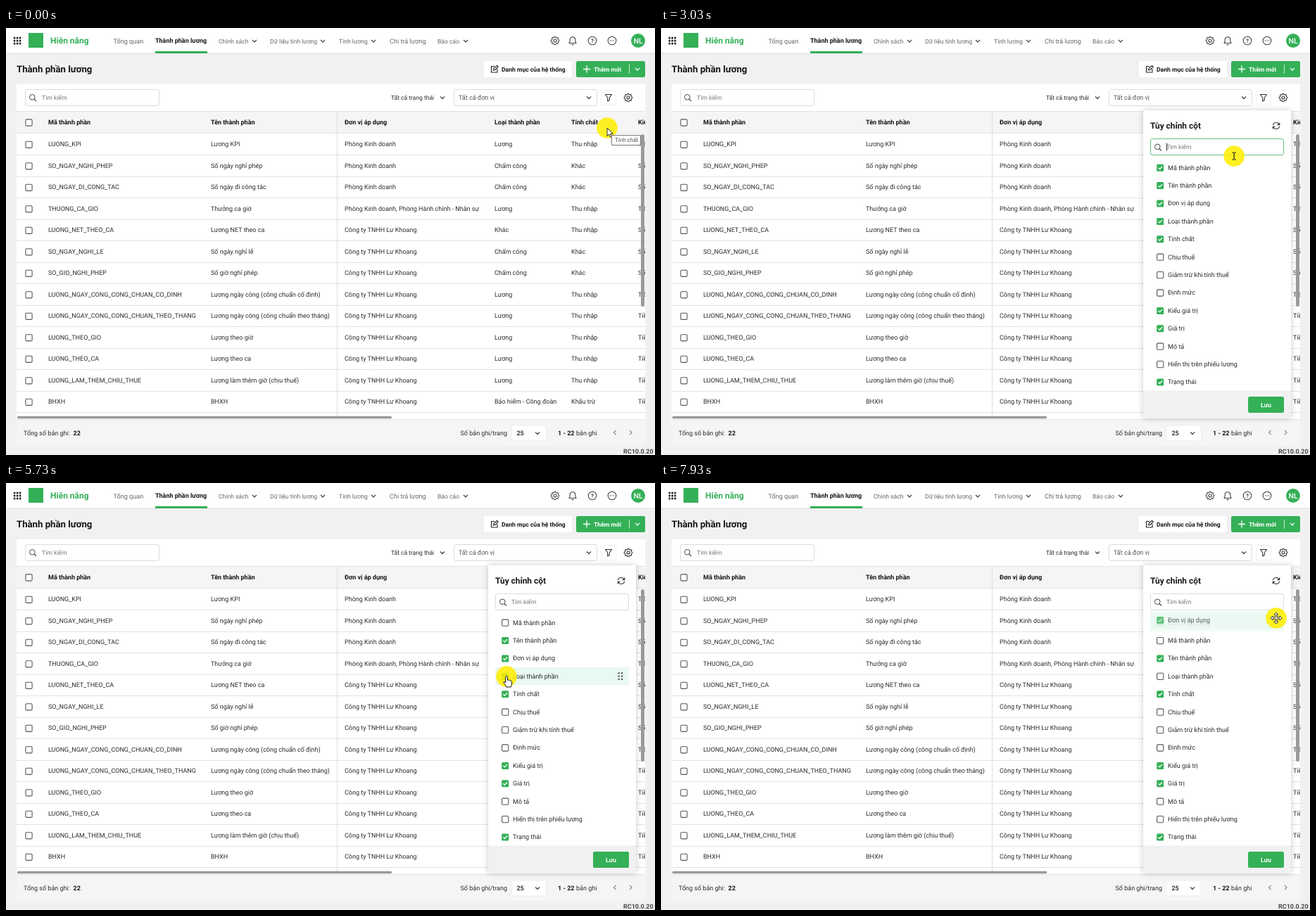
Animation of 922x607 px, one loop 8 s. Source, as an HTML page with a canvas:

```html
<!DOCTYPE html>
<html lang="vi">
<head>
<meta charset="utf-8">
<title>Tùy chỉnh cột</title>
<style>
  html, body { margin: 0; width: 100%; height: 100%; overflow: hidden; background: #f1f1f2; }
  canvas { display: block; }
</style>
</head>
<body>
<canvas id="stage" width="922" height="607"></canvas>
<script>
const ctx = document.getElementById('stage').getContext('2d');
ctx.textRendering = 'geometricPrecision';

const LOOP = 8000;
const GREEN = '#34b057', INK = '#2b2b2b', DARK = '#161616', GRAY = '#666', LINE = '#e2e3e4';

// ---------- drawing helpers ----------
// y is the middle of the capital letters
function text(s, x, y, size = 9, color = INK, weight = 400, align = 'left') {
  ctx.font = `${weight} ${size}px Roboto, sans-serif`;
  ctx.fillStyle = color;
  ctx.textAlign = align;
  ctx.fillText(s, x, y + size * 0.355);
}
const bold = (s, x, y, size = 9, color = DARK, align = 'left') => text(s, x, y, size, color, 700, align);

function rect(x, y, w, h, color) {
  ctx.fillStyle = color;
  ctx.fillRect(x, y, w, h);
}

function box(x, y, w, h, r, fill, stroke, width = 1) {
  ctx.beginPath();
  ctx.roundRect(x, y, w, h, r);
  if (fill) { ctx.fillStyle = fill; ctx.fill(); }
  if (stroke) { ctx.strokeStyle = stroke; ctx.lineWidth = width; ctx.stroke(); }
}

function circle(x, y, r, fill, stroke, width = 1, turn = 1) {
  ctx.beginPath();
  ctx.arc(x, y, r, -Math.PI / 2, -Math.PI / 2 + turn * 2 * Math.PI);
  if (fill) { ctx.fillStyle = fill; ctx.fill(); }
  if (stroke) { ctx.strokeStyle = stroke; ctx.lineWidth = width; ctx.stroke(); }
}

function shape(d, x, y, stroke, width = 1, fill) {
  const path = new Path2D(d);
  ctx.save();
  ctx.translate(x, y);
  ctx.lineJoin = 'round';
  if (fill) { ctx.fillStyle = fill; ctx.fill(path); }
  if (stroke) { ctx.strokeStyle = stroke; ctx.lineWidth = width; ctx.stroke(path); }
  ctx.restore();
}

const chevron = (x, y, color = '#444') => shape('M-3-1.5 0 1.5 3-1.5', x, y, color, 1.2);

function magnifier(x, y) {
  circle(x - 0.7, y - 0.7, 3.8, null, '#444');
  shape('M2 2 5 5', x, y, '#444', 1.1);
}

function gear(x, y, color = '#444') {
  ctx.beginPath();
  for (let i = 0; i <= 64; i++) {
    const a = i / 64 * 2 * Math.PI;
    const r = 5.2 + 0.7 * Math.cos(8 * a);
    ctx.lineTo(x + r * Math.cos(a), y + r * Math.sin(a));
  }
  ctx.strokeStyle = color;
  ctx.lineWidth = 1.1;
  ctx.stroke();
  circle(x, y, 2, null, color, 1.1);
}

function checkbox(x, y, checked) {
  if (!checked) return box(x - 4.6, y - 4.6, 9.2, 9.2, 1.5, '#fff', '#555', 1.1);
  box(x - 5, y - 5, 10, 10, 1.5, GREEN);
  shape('M-2.8 0-.8 2 3-2', x, y, '#fff', 1.3);
}

// ---------- page ----------
const COMPANY = 'Công ty TNHH Lư Khoang', SALES = 'Phòng Kinh doanh';
const PAY = ['Lương', 'Thu nhập', 'Tiền tệ'], SHIFT = ['Chấm công', 'Khác', 'Số'];
const COLUMNS = [60, 291, 481, 694, 803, 898];
const HEADERS = ['Mã thành phần', 'Tên thành phần', 'Đơn vị áp dụng', 'Loại thành phần', 'Tính chất', 'Kiểu giá trị'];
const ROWS = [
  ['LUONG_KPI', 'Lương KPI', SALES, ...PAY],
  ['SO_NGAY_NGHI_PHEP', 'Số ngày nghỉ phép', SALES, ...SHIFT],
  ['SO_NGAY_DI_CONG_TAC', 'Số ngày đi công tác', SALES, ...SHIFT],
  ['THUONG_CA_GIO', 'Thưởng ca giờ', SALES + ', Phòng Hành chính - Nhân sự', ...PAY],
  ['LUONG_NET_THEO_CA', 'Lương NET theo ca', COMPANY, 'Khác', 'Thu nhập', 'Số'],
  ['SO_NGAY_NGHI_LE', 'Số ngày nghỉ lễ', COMPANY, ...SHIFT],
  ['SO_GIO_NGHI_PHEP', 'Số giờ nghỉ phép', COMPANY, ...SHIFT],
  ['LUONG_NGAY_CONG_CONG_CHUAN_CO_DINH', 'Lương ngày công (công chuẩn cố định)', COMPANY, ...PAY],
  ['LUONG_NGAY_CONG_CONG_CHUAN_THEO_THANG', 'Lương ngày công (công chuẩn theo tháng)', COMPANY, ...PAY],
  ['LUONG_THEO_GIO', 'Lương theo giờ', COMPANY, ...PAY],
  ['LUONG_THEO_CA', 'Lương theo ca', COMPANY, ...PAY],
  ['LUONG_LAM_THEM_CHIU_THUE', 'Lương làm thêm giờ (chịu thuế)', COMPANY, ...PAY],
  ['BHXH', 'BHXH', COMPANY, 'Bảo hiểm - Công đoàn', 'Khấu trừ', 'Tiền tệ'],
];

function drawTopBar() {
  rect(0, 35, 922, 2, '#e4e4e5');
  rect(0, 0, 922, 35.5, '#fff');
  for (let i = 0; i < 9; i++) box(10.8 + i % 3 * 4, 12.8 + Math.floor(i / 3) * 4, 2.6, 2.6, 0.6, '#222');
  rect(32, 7, 21, 21, GREEN);
  bold('Hiên nắng', 63, 18, 12, GREEN);

  text('Tổng quan', 152.5, 18.3, 9.1, GRAY);
  bold('Thành phần lương', 212, 18.3);
  rect(212, 33, 74, 3, GREEN);
  const menus = [['Chính sách', 302, 353], ['Dữ liệu tính lương', 375, 450], ['Tính lương', 473, 522], ['Báo cáo', 613, 653]];
  for (const [label, x, arrow] of menus) {
    text(label, x, 18.5, 8.6, GRAY);
    chevron(arrow, 18.5);
  }
  text('Chi trả lương', 545, 18.3, 9.1, GRAY);

  gear(780, 18);
  shape('M-5 3.5C-3.6 2-3.8.5-3.8-1.2-3.8-6.6 3.8-6.6 3.8-1.2 3.8.5 3.6 2 5 3.5ZM-1.5 5.2Q0 6.6 1.5 5.2', 805, 18, '#444', 1.1);
  circle(833, 18, 5.8, null, '#444', 1.1);
  bold('?', 833, 18, 8, '#444', 'center');
  circle(861, 18, 5.8, null, '#444', 1.1);
  for (const dx of [-2.5, 0, 2.5]) circle(861 + dx, 18, 0.7, '#444');
  circle(898, 18, 10, GREEN);
  text('NL', 898, 18, 10.5, '#fff', 500, 'center');
}

function drawToolbar() {
  bold('Thành phần lương', 15, 58, 13.2);
  box(679, 47, 125, 23, 2, '#fff');
  shape('M0-4H-4.5V4.5H4V0M-1.5 1.5-1-1 3.5-5.2 5.2-3.5 1 1Z', 694, 58.5, '#222', 1.1);
  bold('Danh mục của hệ thống', 704, 58.5, 8.6);
  box(810, 47, 98, 23, 2.5, GREEN);
  shape('M-5 0H5M0-5V5', 825, 58.5, '#fff', 1.3);
  bold('Thêm mới', 835, 58.5, 8.6, '#fff');
  rect(885, 52, 1, 13, '#c9eed3');
  chevron(897, 58.5, '#fff');

  rect(15, 80, 893, 514, '#f5f5f6');
  rect(15, 80, 893, 476, '#fff');
  box(27.5, 87.5, 190, 23, 2.5, '#fff', '#dcdcdc');
  magnifier(38, 99);
  text('Tìm kiếm', 51, 99, 8.6, '#777');
  text('Tất cả trạng thái', 547, 99, 8.5);
  chevron(620, 99);
  box(636.5, 87.5, 203, 23, 2.5, '#fff', '#dcdcdc');
  text('Tất cả đơn vị', 643, 99, 9, '#555');
  chevron(828, 99);
  box(845.5, 88.5, 21, 21, 2, '#fff', '#f0f0f0');
  shape('M-4.5-4.5H4.5L1.3 0V3.5L-1.3 5V0Z', 856, 99, '#333', 1.1);
  gear(884, 99, '#333');
}

function drawTable() {
  ctx.save();
  ctx.beginPath();
  ctx.rect(15, 80, 893, 476);
  ctx.clip();
  rect(15, 118, 893, 32, '#f5f5f6');
  rect(15, 118, 893, 1, LINE);
  rect(15, 149, 893, 1, LINE);
  checkbox(32.5, 134.5);
  HEADERS.forEach((label, i) => bold(label, COLUMNS[i], 133.5));
  ROWS.forEach((row, i) => {
    const y = 165.2 + i * 30.5;
    checkbox(32.5, y + 0.6);
    row.forEach((cell, c) => text(cell, COLUMNS[c], y));
    rect(15, Math.round(y + 14.8), 893, 1, LINE);
  });
  rect(470, 118, 1, 438, '#dcddde');
  box(16, 551.8, 532, 3.4, 1.5, '#9a9a9a');
  box(902, 151, 5, 245, 2.5, '#9a9a9a');
  ctx.restore();
}

function drawFooter() {
  rect(15, 556, 893, 1, LINE);
  text('Tổng số bản ghi:', 25, 575.5);
  bold('22', 95.5, 575.5);
  text('Số bản ghi/trang', 645.5, 576);
  box(718, 565, 49.5, 22, 2, '#fff', '#ececec');
  text('25', 725.5, 576, 9, DARK, 500);
  chevron(755, 576);
  bold('1 - 22', 784, 575.5);
  text('bản ghi', 810, 575.5);
  shape('M1.5-3-1.5 0 1.5 3', 865, 575, '#888', 1.1);
  shape('M-1.5-3 1.5 0-1.5 3', 887.5, 575, '#888', 1.1);
  bold('RC10.0.20', 877, 602, 9, '#444');
}

// ---------- column panel ----------
const STEP = 25.4, FIRST = 198.3, DRAGGED = 2;
const ITEMS = ['Mã thành phần', 'Tên thành phần', 'Đơn vị áp dụng', 'Loại thành phần', 'Tính chất', 'Chịu thuế',
  'Giảm trừ khi tính thuế', 'Định mức', 'Kiểu giá trị', 'Giá trị', 'Mô tả', 'Hiển thị trên phiếu lương', 'Trạng thái'];
const CHECKED = [0, 1, 2, 3, 4, 8, 9, 12];
const OPEN = 1960, UNCHECK = { 0: 4630, 3: 6100 }, GRAB = 7260;

function drawItem(item, y, t, hovered) {
  if (hovered) {
    rect(695, y - 12.6, 190, STEP, '#e8f9f1');
    for (let i = 0; i < 6; i++) rect(869.5 + i % 2 * 4.5, y - 5.3 + Math.floor(i / 2) * 4.3, 2.2, 2.2, '#555');
  }
  checkbox(709.2, y + 0.4, CHECKED.includes(item) && !(t >= UNCHECK[item]));
  text(ITEMS[item], 720, y, 9.1);
}

function drawPanel(t, cursor) {
  const alpha = 1 - Math.pow(1 - Math.min(1, (t - OPEN) / 400), 3);
  ctx.save();
  ctx.globalAlpha = alpha;
  ctx.shadowColor = 'rgba(0,0,0,.22)';
  ctx.shadowBlur = 8;
  box(685, 117, 210, 438, 2, '#fff');
  ctx.shadowColor = 'transparent';

  bold('Tùy chỉnh cột', 695, 138.5, 11.9);
  shape('M-4.6-.8C-4-5.2 2.5-5.8 4.3-1.6M4.8-4.6V-1.4H1.6M4.6.8C4 5.2-2.5 5.8-4.3 1.6M-4.8 4.6V1.4H-1.6', 874, 139, '#333', 1.1);
  const focused = t < UNCHECK[0];
  box(695.5, 157.5, 189, 23, 2.5, '#fff', focused ? '#5fc27c' : '#dcdcdc');
  magnifier(706, 169.5);
  text('Tìm kiếm', 718, 169, 8.6, '#777');
  if (focused) rect(718, 163.5, 0.9, 11, '#111');

  const dragging = t >= GRAB;
  const ghostY = cursor.y + 2.7;
  const order = ITEMS.map((_, i) => i);
  if (dragging) {
    const slot = Math.max(0, Math.min(DRAGGED, Math.round((ghostY - FIRST) / STEP)));
    order.splice(DRAGGED, 1);
    order.splice(slot, 0, DRAGGED);
  }
  const inside = cursor.x > 695 && cursor.x < 885;
  const hover = !dragging && inside ? Math.floor((cursor.y - FIRST) / STEP + 0.5) : -1;
  order.forEach((item, i) => {
    const held = dragging && item === DRAGGED;
    ctx.globalAlpha = held ? 0.5 : alpha;
    drawItem(item, FIRST + i * STEP, t, held || i === hover);
  });
  if (dragging) {
    ctx.globalAlpha = 0.75;
    drawItem(DRAGGED, ghostY, t, true);
  }

  ctx.globalAlpha = alpha;
  rect(685, 515.5, 210, 39.5, '#f1f1f2');
  box(834, 524, 51, 23, 2.5, GREEN);
  bold('Lưu', 859.5, 535.5, 8.8, '#fff', 'center');
  ctx.restore();
}

// ---------- pointer ----------
const PATH = [ // time, x, y
  [0, 854, 142], [900, 854, 142], [1020, 857, 138], [1160, 868, 121], [1300, 880, 105], [1430, 883.5, 99.5],
  [2830, 883.5, 99.5], [2900, 868, 125], [2960, 845, 158], [3030, 814.5, 182], [3150, 775, 193], [3300, 738, 199], [3560, 722, 201],
  [3860, 722, 201], [4160, 714, 201], [4330, 708, 200],
  [5130, 708, 200], [5250, 709, 212], [5430, 711, 245], [5600, 711, 268], [5730, 711, 275],
  [6600, 711, 275], [6640, 725, 279], [6720, 790, 274], [6800, 855, 254], [6860, 874, 247.5],
  [7230, 874, 247.5], [7400, 878, 235], [7600, 880, 214], [7800, 876, 197], [7930, 874, 192], [LOOP, 874, 192],
];

function pointerAt(t) {
  const i = PATH.findIndex(key => key[0] > t);
  const [t0, x0, y0] = PATH[i - 1], [t1, x1, y1] = PATH[i];
  const p = (t - t0) / (t1 - t0);
  return { x: x0 + (x1 - x0) * p, y: y0 + (y1 - y0) * p };
}

const ARROW = 'M0 0V11.5L2.7 9 4.6 13.2 6.6 12.3 4.7 8.2H8.2Z';
const HAND = 'M-1.3.6A1.3 1.3 0 0 1 1.3.6V5.2C2 4.6 3.4 4.8 3.6 5.6 4.4 5.1 5.6 5.4 5.8 6.3 6.6 5.9 7.6 6.3 7.6 7.3V10C7.6 11.6 6.6 12.6 6.4 15H-.4C-.6 12.6-2.8 11-3.9 8.8-4.5 7.6-3 6.9-2.2 7.8L-1.3 8.8Z';
const MOVE = 'M0-8 3-5H1V-1H5V-3L8 0 5 3V1H1V5H3L0 8-3 5H-1V1H-5V3L-8 0-5-3V-1H-1V-5H-3Z';
const BEAM = 'M-2.5-5H-.6M.6-5H2.5M0-4.7V4.7M-2.5 5H-.6M.6 5H2.5';

function drawPointer(t, { x, y }) {
  circle(x, y, 14.8, 'rgba(255,238,0,.86)');
  const overGear = Math.hypot(x - 884, y - 99) < 9;
  const overPanel = t > OPEN && x > 695 && x < 885;
  if (overPanel && y > 157 && y < 184) shape(BEAM, x, y, '#111', 1.1);
  else if (overPanel && y > 184 && x > 866) shape(MOVE, x, y, '#333', 1, '#fff');
  else if (overGear || overPanel && y > 184) shape(HAND, x, y, '#111', 1, '#fff');
  else shape(ARROW, x, y, '#111', 0.9, '#fff');
}

function drawTooltip() {
  box(860.5, 152.5, 41, 14, 0, '#fff', '#777');
  text('Tính chất', 865, 159.5, 8, '#555');
}

function render(t) {
  const cursor = pointerAt(t);
  rect(0, 0, 922, 607, '#f1f1f2');
  drawTopBar();
  drawToolbar();
  drawTable();
  drawFooter();
  // ring traced around the settings button until it is clicked
  if (t > 30 && t < OPEN) circle(884, 99, 17.8, null, '#e8322c', 2, Math.min(1, (t - 30) / 670));
  if (t >= OPEN) drawPanel(t, cursor);
  drawPointer(t, cursor);
  if (t < 930) drawTooltip();
}

const start = performance.now();
function tick() {
  render((performance.now() - start) % LOOP);
  requestAnimationFrame(tick);
}
tick();
</script>
</body>
</html>
```
